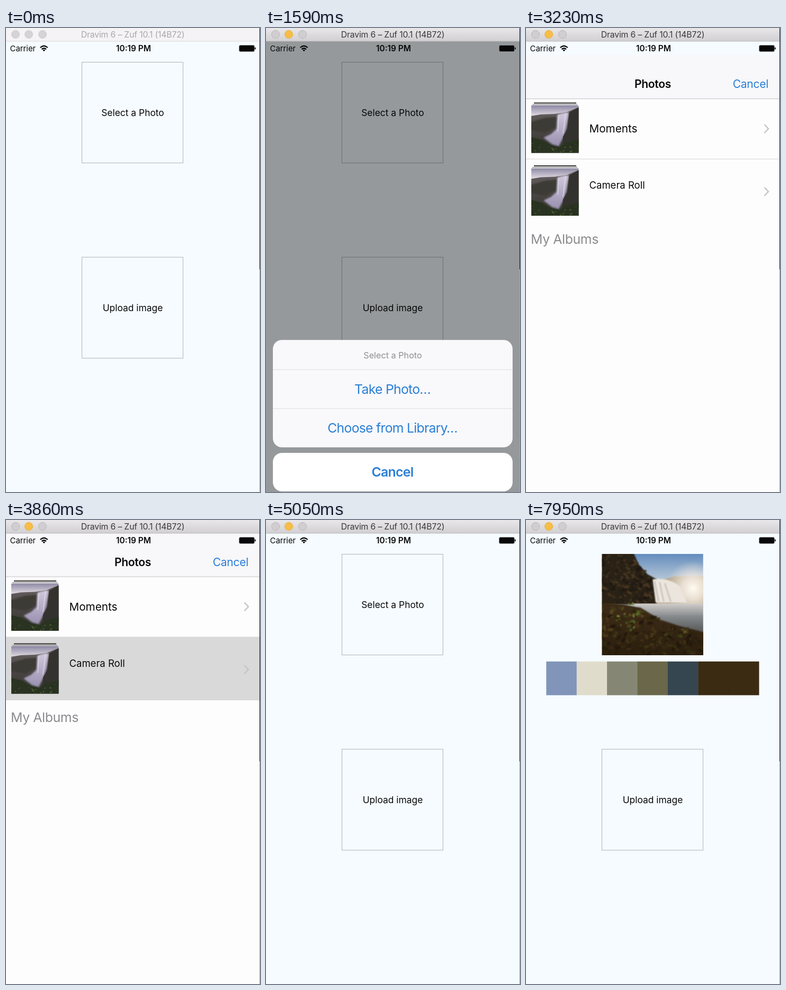
An HTML page for the animation above (8 s loop, 480 by 875 pixels).

```html
<!DOCTYPE html>
<html lang="en">
<head>
<meta charset="utf-8">
<title>Photo picker</title>
<style>
  html, body { margin: 0; width: 100%; height: 100%; overflow: hidden; background: #fff; }
  svg { display: block; }
  #stage { width: 480px; height: 875px; }
  text { font-family: Inter, Roboto, sans-serif; font-optical-sizing: none; font-size: 17.4px; fill: #080808; }
  .mid { text-anchor: middle; }
  .end { text-anchor: end; }
  .semi { font-weight: 600; }
  .blue { fill: #2a7fd6; }
  .title { font-size: 15.8px; letter-spacing: -.011em; }
  .status { font-size: 14.9px; }
  .clock { font-size: 15.4px; }
  .hint { font-size: 16.2px; fill: #8f8f92; }
  .action { font-size: 24.8px; letter-spacing: -.03em; }
  .nav { font-size: 21.1px; letter-spacing: -.015em; }
  .row { font-size: 20.7px; }
  .album { font-size: 18.5px; }
  .section { font-size: 24.8px; letter-spacing: -.015em; fill: #8b8b8e; }
  .box { fill: none; stroke: #b0b4b6; }
  .line { fill: #dededf; }
  .chevron { fill: none; stroke: #c4c4c8; stroke-width: 2.4; }
  .soft { filter: url(#soften); }
  .hazy { filter: url(#haze); }
</style>
</head>
<body>
<svg id="stage" viewBox="0 0 480 875">
  <defs>
    <filter id="soften"><feGaussianBlur stdDeviation=".5"/></filter>
    <filter id="haze"><feGaussianBlur stdDeviation="1.6"/></filter>
    <linearGradient id="chrome" x2="0" y2="1">
      <stop stop-color="#e9e7e9"/><stop offset="1" stop-color="#d1cfd1"/>
    </linearGradient>
    <linearGradient id="blueSky" x2="0" y2="1">
      <stop stop-color="#648dbd"/><stop offset=".36" stop-color="#d7dee2"/>
    </linearGradient>
    <linearGradient id="duskSky" x2="0" y2="1">
      <stop stop-color="#8d88a3"/><stop offset=".2" stop-color="#d9d3dc"/>
    </linearGradient>
    <linearGradient id="paleSky" x2="0" y2="1">
      <stop stop-color="#bcd3e2"/><stop offset=".4" stop-color="#e9ebe6"/>
    </linearGradient>
    <linearGradient id="slope" x2="0" y2="1">
      <stop stop-color="#6b6464"/><stop offset=".5" stop-color="#4b4647"/><stop offset="1" stop-color="#2c3323"/>
    </linearGradient>
    <linearGradient id="water" x2="0" y2="1">
      <stop stop-color="#cfcdca"/><stop offset=".4" stop-color="#8b8e91"/><stop offset="1" stop-color="#666b70"/>
    </linearGradient>
    <linearGradient id="veil" x2="0" y2="1">
      <stop stop-color="#cfc8dc"/><stop offset="1" stop-color="#9a90b0"/>
    </linearGradient>
    <linearGradient id="groundShade" x2="0" y2="1">
      <stop offset=".6" stop-color="#1c1407" stop-opacity="0"/><stop offset="1" stop-color="#1c1407" stop-opacity=".55"/>
    </linearGradient>
    <radialGradient id="mist">
      <stop stop-color="#fffaf0"/><stop offset=".4" stop-color="#f6eee4" stop-opacity=".8"/>
      <stop offset="1" stop-color="#f2e8dc" stop-opacity="0"/>
    </radialGradient>
    <linearGradient id="edgeShade">
      <stop stop-color="#000" stop-opacity="0"/><stop offset="1" stop-color="#000" stop-opacity=".14"/>
    </linearGradient>

    <symbol id="gorge" viewBox="0 0 100 100">
      <rect width="100" height="100" fill="url(#blueSky)"/>
      <path class="soft" d="M50 27 62 25 72 22 104 22V52H50Z" fill="#b5a58b"/>
      <path class="soft" d="M-4-4H30L36 10 45 20 54 25V50H-4Z" fill="#2c2319"/>
      <g id="gorgeCliff" class="soft"></g>
      <circle cx="90" cy="34" r="27" fill="url(#mist)"/>
      <path d="M30 49H100V79L66 70Z" fill="url(#water)"/>
      <path class="soft" d="M50 25Q66 23 77 32L84 48H53Z" fill="#ebe5dd"/>
      <path class="soft" d="M52 27 56 47M57 28 61 47M62 29 68 47" stroke="#c4bdb5" stroke-width="1.2"/>
      <path class="soft" d="M-4 48 22 50 38 53 58 65 76 71 104 78V104H-4Z" fill="#3a2b13"/>
      <g id="gorgeMoss" class="soft"></g>
      <g id="gorgeBush" class="soft"></g>
      <rect width="100" height="100" fill="url(#groundShade)"/>
    </symbol>

    <symbol id="cascade" viewBox="0 0 100 100">
      <rect width="100" height="100" fill="url(#duskSky)"/>
      <path class="soft" d="M-4 23 20 19 50 18 75 14 104 2V104H-4Z" fill="url(#slope)"/>
      <path class="hazy" d="M-4 36 30 26 55 24 54 46 30 58-4 52Z" fill="#3d3a34"/>
      <path class="hazy" d="M55 20Q68 14 79 15L74 48 68 66 58 86 44 82 26 68 42 60 53 50Z" fill="url(#veil)"/>
      <path class="soft" d="M58 20 56 56M72 17 67 60" stroke="#e7e2ef" stroke-width="2" opacity=".6"/>
      <path class="soft" d="M80 15 104 2V84L66 82 67 66 76 50Z" fill="#34322f"/>
      <path class="soft" d="M-4 66 22 72 42 84 60 88 72 78 104 70V104H-4Z" fill="#2a3322"/>
      <g id="cascadeMoss" class="soft"></g>
    </symbol>

    <symbol id="dune" viewBox="0 0 100 100">
      <rect width="100" height="100" fill="url(#paleSky)"/>
      <path class="soft" d="M-4 43 35 38 70 36 86 27 104 34V65H-4Z" fill="#a3a494"/>
      <path class="soft" d="M-4 58Q30 49 62 50L104 43V104H-4Z" fill="#6b6c42"/>
      <g id="duneGrass" class="soft"></g>
      <path d="M0 8 34 47M0 22 36 50M2 30 27 49" stroke="#5d6a57" fill="none"/>
      <path d="M57 61 64 65 68 59 71 64 77 62 72 69H63Z" fill="#f2efc7"/>
    </symbol>

    <symbol id="leaves" viewBox="0 0 100 100">
      <rect width="100" height="100" fill="#7f9a48"/>
      <g id="leafBlobs" class="soft"></g>
      <path d="M43 38Q56 47 54 59L47 71Q36 58 43 38Z" fill="#d3b43e"/>
      <path d="M43 0 48 38" stroke="#4a5f2a" stroke-width="1.5"/>
    </symbol>

    <symbol id="stream" viewBox="0 0 100 100">
      <rect width="100" height="100" fill="#393a2f"/>
      <g id="streamRock" class="soft"></g>
      <path class="soft" d="M46 55 65 37 104 30V104H43Z" fill="#434424"/>
      <g id="streamMoss" class="soft"></g>
      <path class="soft" d="M-4-4H14L22 30 20 52-4 64Z" fill="#b4babf"/>
      <path class="hazy" d="M-4 60 22 45 42 24 52 12 60 20 76 10 98 4 88 22 62 36 46 60 36 104H-4Z" fill="#cfd3d8"/>
      <path class="soft" d="M-4 80 28 58 47 36M10 104 33 66 57 34" stroke="#f5f6f7" stroke-width="5" fill="none"/>
      <path class="soft" d="M17 5 30-4 46 8 34 32 20 42Z" fill="#3c3b38"/>
      <path class="soft" d="M85 56 104 45V104H77Z" fill="#1c1e17"/>
    </symbol>
  </defs>

  <g id="home">
    <rect width="480" height="875" fill="#f5fbff"/>
    <g id="emptySlot">
      <rect class="box" x="143.5" y="64.5" width="191" height="190"/>
      <text class="mid" x="239.5" y="166">Select a Photo</text>
    </g>
    <use id="photo" href="#gorge" x="143.5" y="64" width="191.5" height="191"/>
    <g id="palette"></g>
    <rect class="box" x="143.5" y="432.2" width="191" height="190.5"/>
    <text class="mid" x="239.5" y="534">Upload image</text>
  </g>

  <rect id="dim" width="480" height="875"/>
  <g id="sheet">
    <rect x="13" y="578" width="453" height="202.5" rx="17" fill="#f9f8fa"/>
    <rect class="line" x="13" y="633.5" width="453" height="1"/>
    <rect class="line" x="13" y="707" width="453" height="1"/>
    <text class="mid hint" x="239.5" y="612.5">Select a Photo</text>
    <text class="mid action blue" x="239" y="680">Take Photo…</text>
    <text class="mid action blue" x="239" y="753">Choose from Library…</text>
    <rect x="13" y="791" width="453" height="72.5" rx="17" fill="#fff"/>
    <text class="mid action semi blue" x="239" y="836">Cancel</text>
  </g>

  <g id="picker">
    <rect y="25" width="480" height="870" fill="#fefdfe"/>
    <g id="albums">
      <rect id="pressed" y="221" width="480" height="119" fill="#d9d9d9"/>
      <rect class="line" y="220" width="480" height="1.3"/>
      <g id="albumRow">
        <path d="M15 115H95" stroke="#33322f" stroke-width="2"/>
        <path d="M12 118H97" stroke="#8f8d94" stroke-width="1.5"/>
        <use href="#cascade" x="10" y="119.5" width="89.5" height="89.5"/>
        <path class="chevron" d="M450.5 155.5 458 163.5 450.5 171.5"/>
      </g>
      <use href="#albumRow" y="118.5"/>
      <text class="row" x="119.5" y="170.5">Moments</text>
      <text class="album" x="119.5" y="276.5">Camera Roll</text>
      <text class="section" x="9" y="380.5">My Albums</text>
    </g>
    <g id="roll">
      <rect x="-8" y="107" width="8" height="788" fill="url(#edgeShade)"/>
      <rect y="107" width="490" height="788" fill="#fefdfe"/>
      <use href="#dune" x="0" y="108" width="119" height="119"/>
      <use href="#leaves" x="120.5" y="108" width="119" height="119"/>
      <use href="#gorge" x="240.5" y="108" width="119" height="119"/>
      <use href="#stream" x="361" y="108" width="119" height="119"/>
      <use href="#cascade" x="0" y="228.5" width="119" height="119"/>
    </g>
    <rect y="25" width="480" height="82" fill="#f8f7f9"/>
    <rect y="106.5" width="480" height="1" fill="#c3c2c5"/>
    <text id="albumsTitle" class="mid nav semi" x="239.5" y="86.5">Photos</text>
    <g id="back">
      <path d="M25.500 67.500 13 79 25.500 91" fill="none" stroke="#2a7fd6" stroke-width="3.4"/>
      <text id="backLabel" class="nav blue" x="34" y="86.5">Photos</text>
    </g>
    <text id="rollTitle" class="mid nav semi" x="238.7" y="86.5">Camera Roll</text>
    <text class="end nav blue" x="458" y="86.5">Cancel</text>
  </g>

  <g id="statusBar">
    <text class="status" x="7.5" y="44">Carrier</text>
    <g fill="none" stroke="#080808" stroke-width="2.3">
      <path d="M64.700 37Q71.700 30.500 78.700 37"/>
      <path d="M67.500 40.200Q71.700 36.300 75.900 40.200"/>
    </g>
    <path d="M69.300 41.600Q71.700 39.800 74.100 41.600L71.700 44.200Z"/>
    <text class="mid clock semi" x="241" y="44">10:19 PM</text>
    <rect x="440.5" y="32.5" width="29" height="12" rx="2.5" fill="#080808" stroke="#8d9092" stroke-width=".8"/>
    <rect x="470" y="36.5" width="1.8" height="4" rx="1" fill="#080808"/>
  </g>

  <rect id="titleBar" width="480" height="25"/>
  <rect id="titleEdge" y="24.5" width="480" height="1"/>
  <g id="lights">
    <circle cx="18" cy="12" r="7.5"/><circle cx="43" cy="12" r="7.5"/><circle cx="69" cy="12" r="7.5"/>
  </g>
  <text id="title" class="mid title" x="239.5" y="18">Dravim 6 – Zuf 10.1 (14B72)</text>
  <rect x="479" width="1" height="455" fill="#25272b"/>
  <rect x="479" y="455" width="1" height="420" fill="#a5a7a9"/>
</svg>

<script>
const $ = id => document.getElementById(id);
const LOOP = 8000;

// Seeded generator for the textures
let seed = 7;
const random = () => (seed = seed * 16807 % 2147483647) / 2147483647;
const between = (a, b) => a + (b - a) * random();

// Scatters tilted ellipses, each kept inside the area allowed by `inside`
function scatter(id, count, [x0, y0, x1, y1], colors, [rx, ry], inside = () => true) {
  let out = '';
  for (let i = 0; i < count; i++) {
    const x = between(x0, x1), y = between(y0, y1);
    const scale = between(.5, 1.3), angle = between(-70, 70);
    const color = colors[Math.floor(random() * colors.length)];
    if (!inside(x, y)) continue;
    out += `<ellipse rx="${rx * scale}" ry="${ry * scale}" fill="${color}" transform="translate(${x} ${y}) rotate(${angle})"/>`;
  }
  $(id).innerHTML = out;
}

scatter('gorgeCliff', 200, [-2, -2, 50, 48], ['#1e1811', '#3c2f1f', '#4a3824', '#241c14'], [2.2, 1],
  (x, y) => y > (x - 26) * 1.1);
scatter('gorgeMoss', 320, [-2, 50, 102, 102], ['#22190c', '#4d381b', '#5d4823', '#3c3a18', '#2c220f', '#33270f'], [2.4, 1.2],
  (x, y) => y > 53 + Math.max(0, x - 30) * .4);
scatter('gorgeBush', 90, [8, 42, 90, 84], ['#5f7530', '#86944a', '#4b5b22'], [1.6, .9],
  (x, y) => Math.hypot(x - 24, (y - 62) * .8) < 13 || Math.hypot(x - 54, y - 66) < 6 || Math.hypot(x - 79, y - 79) < 6);
scatter('cascadeMoss', 110, [-2, 70, 102, 102], ['#202b1b', '#3c5029', '#48602c', '#2f3024'], [2, 1],
  (x, y) => y > 90 - Math.abs(x - 50) * .3);
scatter('duneGrass', 260, [-2, 57, 102, 102], ['#46582e', '#7b8750', '#7e5035', '#5c3c27', '#8b9660', '#394825'], [1, 4]);
scatter('leafBlobs', 150, [0, 0, 100, 100], ['#87a33f', '#a9c05c', '#5d7a33', '#9fb84d', '#4b632c', '#ccd8a4'], [7, 3]);
scatter('streamRock', 80, [20, 0, 100, 50], ['#22231d', '#4b4939', '#5a5643', '#2f3024'], [4, 2]);
scatter('streamMoss', 110, [46, 38, 100, 100], ['#555a28', '#34361e', '#656329', '#28291b'], [3, 1.5],
  (x, y) => y > 90 - x * .5);

const swatches = ['#8095b9', '#e0dccc', '#858774', '#6a674a', '#364650', '#3a2b12', '#3a2b12'];
$('palette').innerHTML = swatches.map((color, i) =>
  `<rect x="${38.3 + i * 57.4}" y="266.8" width="57.8" height="63.6" fill="${color}"/>`).join('');

const shift = (id, x, y) => $(id).setAttribute('transform', `translate(${x} ${y})`);
const fade = (id, opacity) => $(id).setAttribute('opacity', opacity);
const show = (id, visible) => $(id).setAttribute('display', visible ? 'inline' : 'none');

function drawTitleBar(active) {
  $('titleBar').setAttribute('fill', active ? 'url(#chrome)' : '#f5f3f5');
  $('titleEdge').setAttribute('fill', active ? '#b9b7b9' : '#d9d8da');
  $('title').style.fill = active ? '#3a393b' : '#a9a8aa';
  [...$('lights').children].forEach((light, i) => {
    light.setAttribute('fill', active && i === 1 ? '#f7bd45' : active ? '#d0ced0' : '#d5d3d5');
    light.setAttribute('stroke', !active ? '#d0ced0' : i === 1 ? '#e6b044' : '#b9b7b9');
  });
}

function draw(t) {
  const glide = (start, duration = 500) =>
    1 - (1 - Math.min(1, Math.max(0, (t - start) / duration))) ** 4;

  drawTitleBar(t >= 700);

  const sheet = glide(1306) - glide(2560, 400);
  fade('dim', .405 * sheet);
  shift('sheet', 0, 300 * (1 - sheet));

  const picker = glide(2941) - glide(4480, 420);
  show('picker', picker > 0);
  shift('picker', 0, 850 * (1 - picker));

  const push = glide(3870);
  show('pressed', t >= 3800);
  show('roll', push > 0);
  shift('albums', -144 * push, 0);
  shift('roll', 480 * (1 - push), 0);
  shift('albumsTitle', -170 * push, 0);
  fade('albumsTitle', Math.max(0, 1 - 1.6 * push));
  fade('back', push);
  shift('backLabel', 170 * (1 - push), 0);
  shift('rollTitle', 200 * (1 - push), 0);
  fade('rollTitle', push);

  const picked = t >= 5400;
  show('emptySlot', !picked);
  show('photo', picked);
  show('palette', t >= 6000);
}

function tick() {
  draw(performance.now() % LOOP);
  requestAnimationFrame(tick);
}
tick();
</script>
</body>
</html>
```
